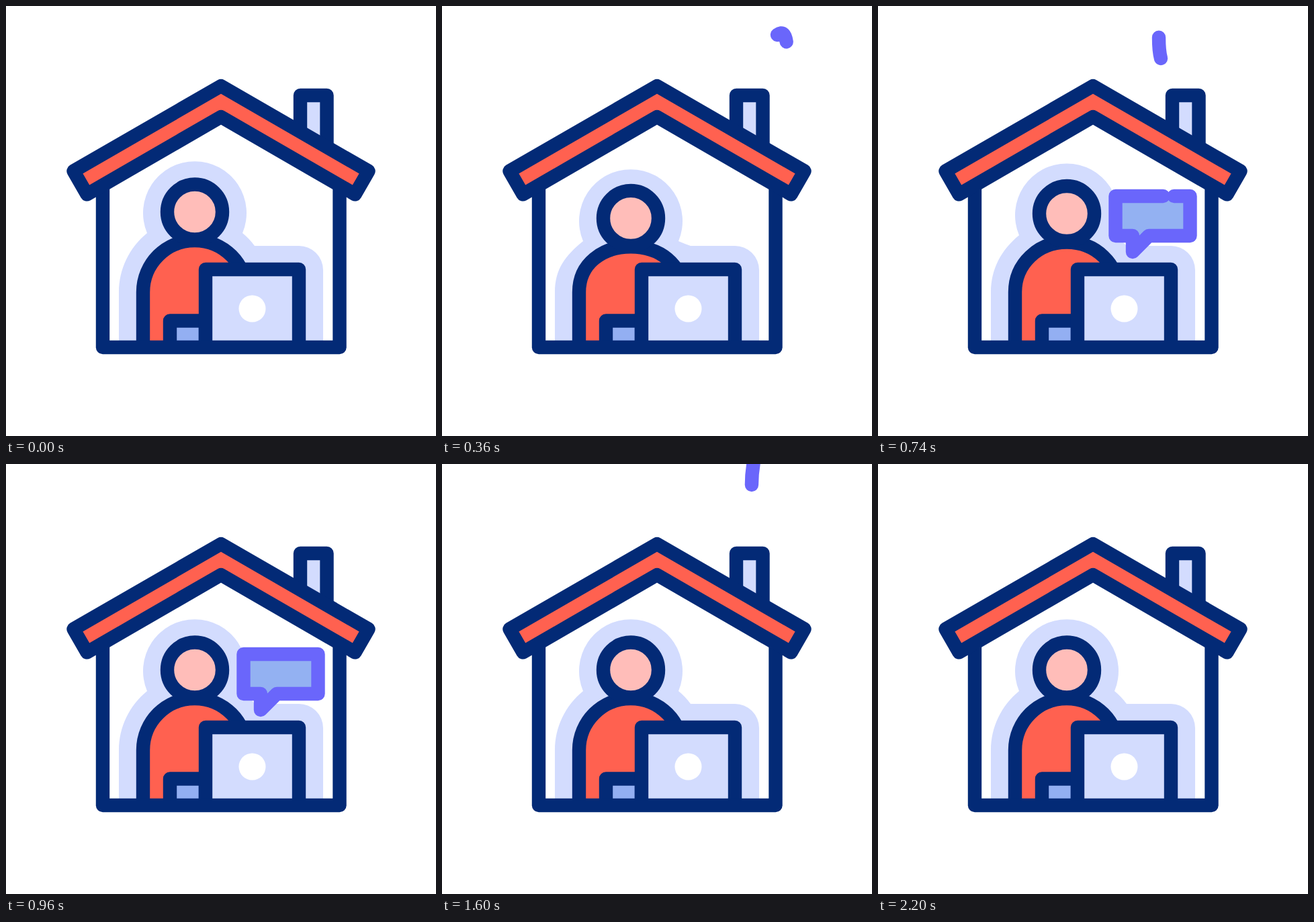
These frames come from a looping animation (640 by 640 pixels, 2.22 s). An HTML page:

```html
<!DOCTYPE html>
<html lang="en">
<head>
<meta charset="utf-8">
<title>Working from home</title>
<style>
html, body { margin: 0; width: 100%; height: 100%; overflow: hidden; background: #fff; }
svg { display: block; width: 100vw; height: 100vh; }
.line { stroke: #032a76; stroke-width: 20.4; stroke-linejoin: round; }
.pen { stroke: #6a66fb; stroke-width: 20.4; stroke-linejoin: round; stroke-linecap: round; }
</style>
</head>
<body>
<svg viewBox="0 0 640 640" fill="none">
  <path id="halo" fill="#d3dcfe"/>
  <path id="body" class="line" fill="#ff6150"/>
  <circle id="head" class="line" cx="281" r="41" fill="#ffbdb9"/>
  <path class="line" fill="#93aff2" d="M244 508V468.500H297V508"/>
  <path class="line" fill="#d3dcfe" d="M297 508V392H436V508"/>
  <circle cx="366.500" cy="450.500" r="20" fill="#fff"/>
  <path class="line" d="M144 262V508H496.500V262"/>
  <path class="line" fill="#d3dcfe" d="M438 195V133H477.500V215"/>
  <path class="line" fill="#ff6150" d="M320 119L539.500 245.700L519.500 280.300L320 165L120.500 280.300L100.500 245.700Z"/>
  <path id="bubble" class="pen" fill="#93b1f2"/>
  <g id="smoke" class="pen"></g>
</svg>
<script>
const LOOP = 2220;
const $ = id => document.getElementById(id);
const clamp = x => Math.max(0, Math.min(1, x));
const phase = (t, from, to) => clamp((t - from) / (to - from));
const smooth = p => p * p * (3 - 2 * p);

// Both arms of the speech bubble start at the tip of its tail.
const leftArm = [[379, 366], [379, 342], [353.5, 342], [353.5, 283], [432.5, 283]];
const rightArm = [[379, 366], [403, 342], [464.5, 342], [464.5, 283], [432.5, 283]];

// Each wisp grows from its foot, then is wiped away from its foot.
const wisps = [
  { d: "M513 71C514 50 511 34 499 43", births: [245, 1300], grow: 60, wipe: [90, 150] },
  { d: "M481 93C467 77 462 55 461 37C460.500 20 462 5 466 -14", births: [430, 1475], grow: 128, wipe: [72, 163] },
  { d: "M421 78C418 67 418 57 418 47C418 30 414 15 414 -14", births: [707, 1750], grow: 100, wipe: [80, 195] }
];

for (const w of wisps) {
  w.el = document.createElementNS("http://www.w3.org/2000/svg", "path");
  w.el.setAttribute("d", w.d);
  $("smoke").append(w.el);
  w.len = w.el.getTotalLength();
}

function armLength(points) {
  let sum = 0;
  for (let i = 1; i < points.length; i++)
    sum += Math.hypot(points[i][0] - points[i - 1][0], points[i][1] - points[i - 1][1]);
  return sum;
}

function cutArm(points, part) {
  let rest = armLength(points) * part;
  const out = [points[0]];
  for (let i = 1; i < points.length && rest > 0; i++) {
    const [x, y] = points[i - 1], [u, v] = points[i];
    const len = Math.hypot(u - x, v - y), k = Math.min(1, rest / len);
    out.push([x + (u - x) * k, y + (v - y) * k]);
    rest -= len;
  }
  return out;
}

function drawPerson(t) {
  const sink = t < 200 ? smooth(t / 200) : Math.pow(1 - phase(t, 200, 960), 1.3);
  const h = 16.3 * sink, b = 12.8 * sink;
  $("head").setAttribute("cy", 306.5 + b);
  $("body").setAttribute("d",
    `M204 508V426C204 383.500 238.500 ${349 + b} 281 ${349 + b}` +
    `S358 383.500 358 426V508`);
  $("halo").setAttribute("d",
    `M168 508V426C168 391.800 183.400 ${359.5 + h} 210 ${338 + h}` +
    `A77 77 0 1 1 352 ${338 + h}Q362 ${346 + h * 0.7} 370 357` +
    `H436A36 36 0 0 1 472 393V508Z`);
}

function drawBubble(t) {
  const part = smooth(phase(t, 400, 790)) * (1 - smooth(phase(t, 1220, 1570)));
  const el = $("bubble");
  el.style.display = part > 0 ? "" : "none";
  const points = cutArm(leftArm, part).reverse().concat(cutArm(rightArm, part).slice(1));
  el.setAttribute("d", "M" + points.join("L") + (part === 1 ? "Z" : ""));
}

function drawSmoke(t) {
  for (const w of wisps) {
    const age = t - (t < w.births[1] ? w.births[0] : w.births[1]);
    const front = phase(age, 0, w.grow) * w.len;
    const tail = phase(age, ...w.wipe) * w.len;
    const shown = front > tail;
    w.el.style.display = shown ? "" : "none";
    if (shown) w.el.setAttribute("stroke-dasharray", `0 ${tail} ${front - tail} 999`);
    // A leading zero dash would leave a round dot at the foot.
    if (shown && tail > 0) {
      w.el.setAttribute("stroke-dasharray", `${front - tail} 999`);
      w.el.setAttribute("stroke-dashoffset", -tail);
    } else {
      w.el.setAttribute("stroke-dashoffset", 0);
    }
  }
}

function render(t) {
  drawPerson(t);
  drawBubble(t);
  drawSmoke(t);
}

const start = performance.now();
function tick() {
  render((performance.now() - start) % LOOP);
  requestAnimationFrame(tick);
}
tick();
</script>
</body>
</html>
```
